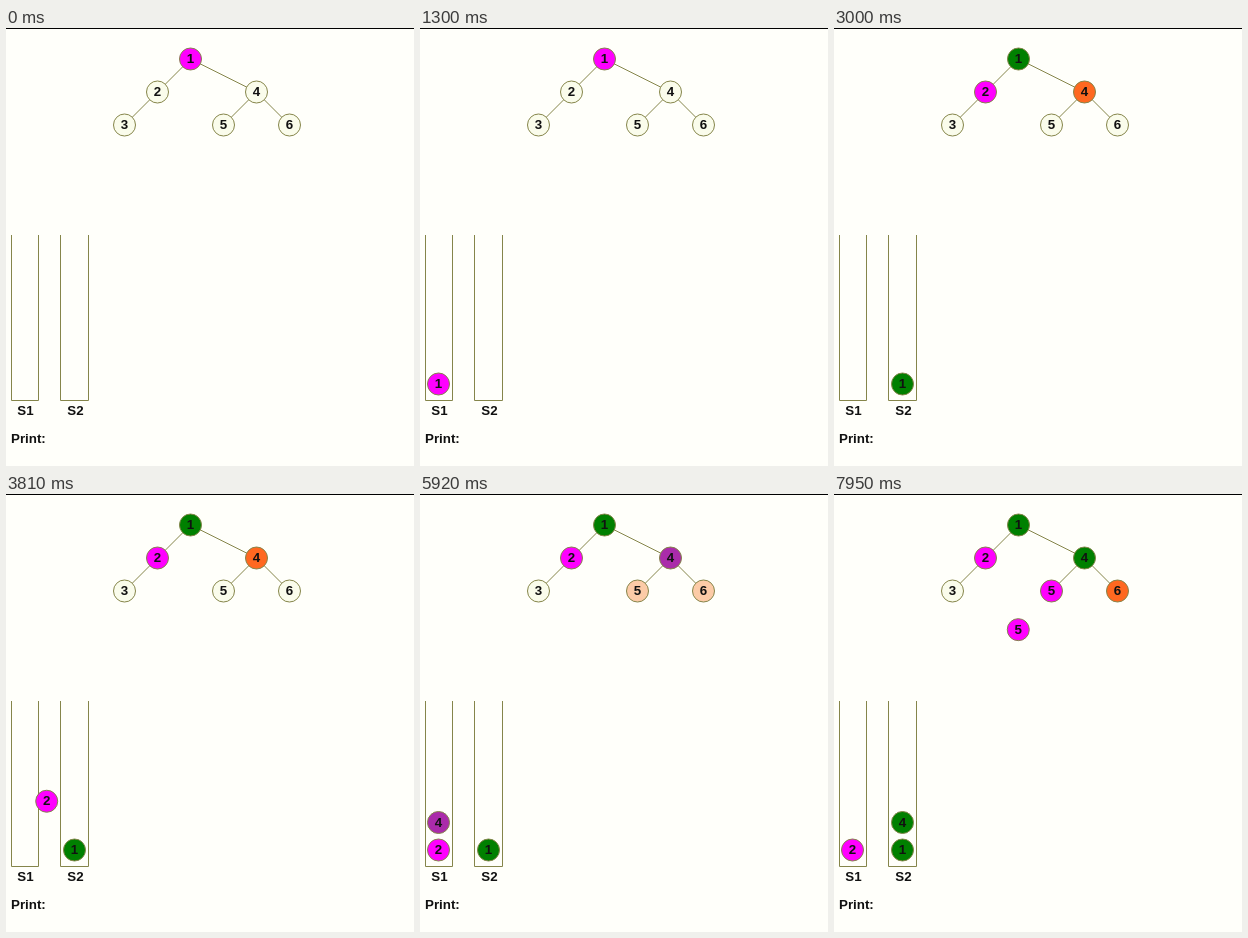
Write an HTML page that moves like this. It is 408 px wide and 438 px high and loops after 7.99 s.

```html
<!DOCTYPE html>
<html lang="en">
<head>
<meta charset="utf-8">
<title>Postorder traversal with two stacks</title>
<style>
  html, body { margin: 0; width: 100%; height: 100%; overflow: hidden; background: #fffffa; }
  svg { display: block; width: 408px; height: 438px; }
  .line { fill: none; stroke: #85854a; stroke-width: 1; }
  circle { stroke: #85854a; stroke-width: 1; }
  text { font: bold 13.33px "Liberation Sans", Arial, sans-serif; fill: #111; }
  .mid { text-anchor: middle; }
</style>
</head>
<body>
<svg viewBox="0 0 408 438">
  <rect width="408" height="1" fill="#000"/>
  <path class="line" d="M184.5 31 118.5 97M184.5 31 250.5 64 283.5 97M250.5 64 217.5 97"/>
  <path class="line" d="M5.5 207V372.5H32.5V207M54.5 207V372.5H82.5V207"/>
  <text class="mid" x="19.5" y="387">S1</text>
  <text class="mid" x="69.5" y="387">S2</text>
  <text x="5" y="415">Print:</text>
  <g id="tree"></g>
  <g id="balls"></g>
</svg>
<script>
const LOOP = 7990, TICK = 40, MOVE_MS = 500, FADE_TICKS = 3;
const PLAIN = [250, 252, 235], QUEUED = [255, 104, 32], PUSHED = [255, 0, 255], DONE = [0, 128, 0];

const tree = {
  1: [184.5, 31], 2: [151.5, 64], 3: [118.5, 97],
  4: [250.5, 64], 5: [217.5, 97], 6: [283.5, 97]
};

// Place of an item at a given height in stack 1 or 2
const slot = (stack, level) => [stack === 1 ? 18.5 : 68.5, 356 - 27.5 * level];

// Colour changes per value: [time, colour]
const fades = {
  1: [[0, PUSHED], [1460, DONE]],
  2: [[1460, QUEUED], [2920, PUSHED]],
  4: [[1460, QUEUED], [4420, PUSHED], [5920, DONE]],
  5: [[5920, QUEUED], [7380, PUSHED]],
  6: [[5920, QUEUED]]
};

// Moves per value: [time, progress at first step, destination]
const moves = {
  1: [[450, .1, slot(1, 0)], [1950, .05, slot(2, 0)]],
  2: [[3450, .113, slot(1, 0)]],
  4: [[4950, .113, slot(1, 1)], [6410, .05, slot(2, 1)]],
  5: [[7910, .087, slot(1, 1)]]
};

const mix = (a, b, p) => a.map((v, i) => v + (b[i] - v) * p);
const ticks = ms => Math.floor(ms / TICK);

function makeNode(parent, value) {
  const ns = "http://www.w3.org/2000/svg";
  const group = document.createElementNS(ns, "g");
  const disc = document.createElementNS(ns, "circle");
  const label = document.createElementNS(ns, "text");
  disc.setAttribute("r", 11);
  label.setAttribute("class", "mid");
  label.setAttribute("y", 4);
  label.textContent = value;
  group.append(disc, label);
  document.getElementById(parent).append(group);
  return { group, disc };
}

function place(node, [x, y], colour) {
  node.group.setAttribute("transform", `translate(${x.toFixed(2)} ${y.toFixed(2)})`);
  node.disc.setAttribute("fill", `rgb(${colour.map(Math.round)})`);
}

function colourAt(value, t) {
  let colour = PLAIN;
  for (const [start, next] of fades[value] || []) {
    if (t < start) break;
    const p = start ? Math.min(1, (ticks(t - start) + 1) / FADE_TICKS) : 1;
    colour = mix(colour, next, p);
  }
  return colour;
}

function positionAt(value, t) {
  let pos = tree[value];
  for (const [start, first, dest] of moves[value]) {
    if (t < start) break;
    pos = mix(pos, dest, Math.min(1, first + ticks(t - start) * TICK / MOVE_MS));
  }
  return pos;
}

const nodes = {}, balls = {};
for (const v in tree) nodes[v] = makeNode("tree", v);
for (const v in moves) balls[v] = makeNode("balls", v);

function draw(t) {
  for (const v in nodes) place(nodes[v], tree[v], colourAt(v, t));
  for (const v in balls) {
    const active = t >= moves[v][0][0];
    balls[v].group.setAttribute("visibility", active ? "visible" : "hidden");
    if (active) place(balls[v], positionAt(v, t), colourAt(v, t));
  }
}

const begin = performance.now();
function frame() {
  draw((performance.now() - begin) % LOOP);
  requestAnimationFrame(frame);
}
frame();
</script>
</body>
</html>
```
